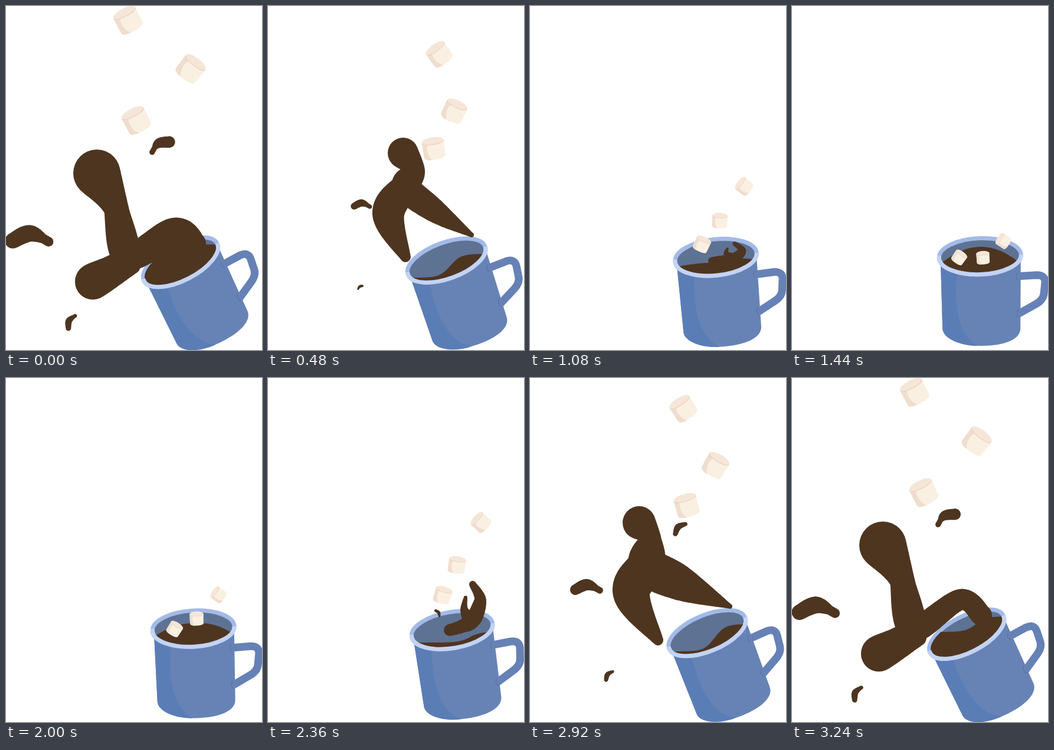
These frames come from a looping animation (434 px wide and 580 px high, 3280 ms). An HTML page with a canvas:

```html
<!DOCTYPE html>
<html lang="en">
<head>
<meta charset="utf-8">
<title>Cocoa splash</title>
<style>
html, body { margin: 0; width: 100%; height: 100%; overflow: hidden; background: #fff }
canvas { display: block }
</style>
</head>
<body>
<canvas id="stage" width="434" height="580"></canvas>
<script>
const ctx = document.getElementById('stage').getContext('2d');
const LOOP = 3280, STEP = 40, SETTLED = 1600;
const COCOA = '#4e3520';
const RIM_SKEW = -.035;

const mix = (a, b, u) => a + (b - a) * u;
const ease = (s, from, to) =>
  (1 - Math.cos(Math.PI * Math.min(1, Math.max(0, (s - from) / (to - from))))) / 2;

// Splash skeleton, [x, y, radius] for: head, neck, chest, elbow, foot, knee, hand
const spill = [[154,282,40], [187,342,21], [204,423,22], [147,465,30], [214,438,14], [285,374,18], [321,400,18]];
const closed = spill.map((node, i) => i === 5 ? [285,383,26] : node);
const arch = [[185,244,28], [206,270,16], [198,314,31], [172,364,31], [217,442,9], [251,344,30], [339,385,4]];
const stretch = [[229,248,26], [251,279,15], [233,304,23], [204,351,27], [233,423,9], [281,344,20], [345,386,4]];
const fork = [[328,315,11], [341,337,12], [337,384,15], [322,370,8], [310,346,4], [337,406,10], [338,422,15]];
const dive = [[347,348,6], [360,375,10], [347,408,13], [333,392,7], [335,370,3], [328,419,11], [308,425,10]];
const sunk = dive.map(([x, , r]) => [x, 432, r * .4]);
const limbs = [[0, 1, 2, 3, 4], [1, 2, 5, 6]];
const splash = [[0, closed], [40, spill], [360, arch], [480, stretch], [800, fork], [920, dive], [1240, sunk]]
  .map(([time, pose]) => [time, pose.flat()]);

// Cocoa surface in the mug: level, step height, step x, dome
const pool = [
  [0, [402, 0, 312, 0]], [40, [415, 13, 312, 0]], [360, [438, 23, 313, 0]], [480, [438, 20, 309, 0]],
  [800, [440, 13, 335, 0]], [920, [437, 9, 342, 0]], [1440, [406, 0, 342, 24]]];

// Loose drops: x, y, angle, length, which end is heavy
const drops = [
  [[0, [41, 390, 0, 82, 1]], [360, [97, 353, 0, 56, 1]], [480, [159, 335, 0, 36, 1]],
    [800, [273, 396, 52, 58, 1]], [920, [288, 396, 52, 16, 0]], [1080, [292, 445, 52, 6, 0]]],
  [[0, [260, 235, -32, 46, -2]], [360, [253, 253, -45, 32, .3]], [480, [276, 246, -45, 2, 0]]],
  [[0, [109, 532, -63, 32, .6]], [360, [133, 501, -52, 24, .6]], [480, [156, 474, -35, 13, 0]],
    [680, [212, 425, -35, 1, 0]]]];

// Marshmallows: start and end points and turns, fall times, sideways bow and where it peaks
const mallows = [
  {x: [207, 358], y: [24, 407], turn: [-27, -56], fall: [100, 1600], bow: 67, skew: .87},
  {x: [313, 324], y: [106, 428], turn: [38, -4], fall: [0, 1540], bow: 0, skew: 1},
  {x: [221, 283], y: [193, 424], turn: [-27, 36], fall: [120, 1320], bow: 50, skew: .65}];

// Monotone cubic interpolation, at rest at both ends
function tween(keys, s) {
  const last = keys.length - 1;
  if (s >= keys[last][0]) return keys[last][1];
  let k = 0;
  while (s >= keys[k + 1][0]) k++;
  const h = keys[k + 1][0] - keys[k][0], u = (s - keys[k][0]) / h;
  const rate = (j, i) => (keys[j + 1][1][i] - keys[j][1][i]) / (keys[j + 1][0] - keys[j][0]);
  const slope = (j, i) => {
    if (j === 0 || j === last) return 0;
    const a = rate(j - 1, i), b = rate(j, i);
    return a * b > 0 ? 2 * a * b / (a + b) : 0;
  };
  return keys[k][1].map((a, i) => mix(a, keys[k + 1][1][i], u * u * (3 - 2 * u))
    + h * u * (1 - u) * ((1 - u) * slope(k, i) - u * slope(k + 1, i)));
}

// Liquid strand: circles swept along a smooth curve through the nodes
function strand(nodes) {
  const at = i => nodes[Math.min(nodes.length - 1, Math.max(0, i))];
  ctx.beginPath();
  for (let t = 0; t <= nodes.length - 1; t += 1 / 32) {
    const i = Math.floor(t), u = t - i;
    const [x, y, r] = at(i).map((b, n) => {
      const a = at(i - 1)[n], c = at(i + 1)[n], d = at(i + 2)[n];
      return b + u / 2 * (c - a + u * (2 * a - 5 * b + 4 * c - d + u * (3 * (b - c) + d - a)));
    });
    ctx.moveTo(x, y);
    ctx.arc(x, y, Math.max(.1, r), 0, 7);
  }
  ctx.fillStyle = COCOA;
  ctx.fill();
}

const fill = (path, color) => { ctx.fillStyle = color; ctx.fill(new Path2D(path)); };
const line = (path, color, width) => {
  ctx.strokeStyle = color;
  ctx.lineWidth = width;
  ctx.stroke(new Path2D(path));
};
function placed(x, y, deg, size, draw) {
  ctx.save();
  ctx.translate(x, y);
  ctx.rotate(deg * Math.PI / 180);
  ctx.scale(size, size);
  draw();
  ctx.restore();
}
function rim(from, to, color) {
  ctx.beginPath();
  ctx.ellipse(0, 0, 69.5, 30.5, RIM_SKEW, from, to);
  ctx.strokeStyle = color;
  ctx.lineWidth = 7;
  ctx.stroke();
}

function mugBack() {
  line('M62 34L96 32Q111 32 110 45L108 63Q107 74 94 81L65 97', '#6681b5', 13);
  fill('M-67 5L-64 122C-63 138-35 151 2 151C42 151 68 140 68 122L69 0Z', '#6783b5');
  fill('M-67 5L-64 122C-63 138-35 151-5 151C-36 132-46 90-38 25Z', '#5b7db6');
  line('M64 28Q58 34 64 40M65 89Q59 96 65 103', '#56719f', 1);
  ctx.beginPath();
  ctx.ellipse(0, 0, 69, 30, RIM_SKEW, 0, 7);
  ctx.fillStyle = '#5e7294';
  ctx.fill();
  rim(0, 7, '#a3bae8');
}

function drawPool(x, y, tilt, [level, step, edge, dome]) {
  ctx.save();
  ctx.beginPath();
  ctx.ellipse(x, y, 67, 28, tilt * Math.PI / 180 + RIM_SKEW, 0, 7);
  ctx.clip();
  ctx.beginPath();
  ctx.moveTo(220, 540);
  for (let px = 220; px <= 400; px += 4) {
    ctx.lineTo(px, level - step * Math.tanh((px - edge) / 18) + dome * ((px - 320) / 62) ** 2);
  }
  ctx.lineTo(400, 540);
  ctx.fillStyle = COCOA;
  ctx.fill();
  ctx.restore();
}

function mallow() {
  fill('M-19-12C-19-22 19-22 19-12L18.500 13C18 21-18 21-18.500 13Z', '#faf0e2');
  fill('M-19-12L-18.500 13C-18 17-12 19-5 19C-12 11-13 0-10-7Z', '#efdecf');
  fill('M-19-12C-19-22 19-22 19-12C18-5-18-5-19-12Z', '#f5e6d8');
  line('M-18.500-11.500C-16-5.500 16-5.500 18.500-12', '#e9d0be', 1);
}

function draw(s) {
  const p = ease(s, 0, 1540), lean = p ** .82;
  const tilt = -25 * (1 - lean), x = 319 + .92 * tilt, y = 422 - .4 * tilt;

  ctx.fillStyle = '#fff';
  ctx.fillRect(0, 0, 434, 580);
  placed(x, y, tilt, 1, mugBack);
  drawPool(x, y, tilt, tween(pool, s));

  const pose = tween(splash, s);
  for (const limb of limbs) strand(limb.map(i => pose.slice(i * 3, i * 3 + 3)));
  for (const keys of drops) {
    if (s >= keys[keys.length - 1][0]) continue;
    const [dx, dy, angle, size, heavy] = tween(keys, s);
    placed(dx, dy, angle, size, () =>
      strand([[-.36, .07, .11 + .05 * heavy], [0, -.08, .17], [.38, .09, .11 - .05 * heavy]]));
  }
  placed(x, y, tilt, 1, () => rim(0, Math.PI * 1.04, '#c3d3f4'));

  for (const m of mallows) {
    const mx = mix(...m.x, p) + m.bow * Math.sin(Math.PI * p ** m.skew);
    const my = mix(...m.y, ease(s, ...m.fall));
    placed(mx, my, mix(...m.turn, lean), mix(1.1, .58, p), mallow);
  }
}

// Pours back into the mug, rests, then spills again in reverse
function frame(now) {
  const t = Math.floor(now % LOOP / STEP + .02) * STEP % LOOP;
  draw(Math.min(t, LOOP - t, SETTLED));
  requestAnimationFrame(frame);
}
requestAnimationFrame(frame);
</script>
</body>
</html>
```
